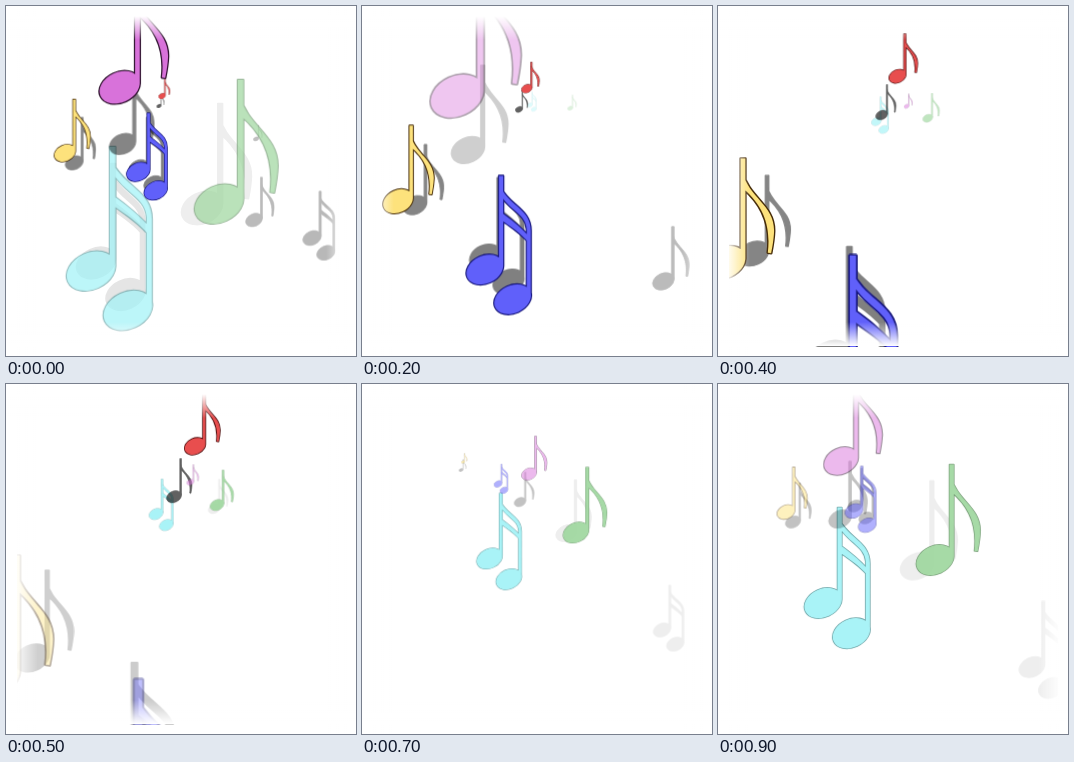
Recreate the animation shown at these times as an HTML page. Size 350x350 px, loop 1000 ms.

```html
<!DOCTYPE html>
<html lang="en">
<head>
<meta charset="utf-8">
<title>Floating notes</title>
<style>
  html, body { margin: 0; width: 100%; height: 100%; overflow: hidden; background: #fff; }
  svg { display: block; width: 100vw; height: 100vh; }
  path { paint-order: stroke; stroke-linejoin: round; }
</style>
</head>
<body>
<svg viewBox="0 0 350 350">
  <defs>
    <linearGradient id="fadeOut"><stop stop-color="#fff" stop-opacity="0"/><stop offset="1" stop-color="#fff"/></linearGradient>
    <clipPath id="frame"><rect x="11" y="10" width="329" height="331"/></clipPath>
    <rect id="edge" width="24" height="350" fill="url(#fadeOut)"/>
  </defs>
  <g id="notes" clip-path="url(#frame)"></g>
  <use href="#edge" x="320"/>
  <use href="#edge" transform="translate(32 350) rotate(180)"/>
  <use href="#edge" transform="translate(350 316) rotate(90)"/>
  <use href="#edge" transform="translate(0 34) rotate(-90)"/>
</svg>
<script>
const STEPS = 10, LOOP = 1000;
const layer = document.getElementById('notes');

// Shapes are drawn around the first head, with a stem 100 units tall.
const head = 'M-18.5 8.5A20.3 14.6 -25 1 1 18.5 -8.5A20.3 14.6 -25 1 1 -18.5 8.5Z';
const stem = 'M15 -99.5H19.5V-4H15Z';
const single = head + stem +
  'M17 -86C23 -62 47.5 -55 47 -30C46.7 -22 45.2 -14 44.2 -9L41 -9.5C43.5 -30 40 -52 17 -71Z';
const pair = head + stem +
  'M11 40A20.3 14.6 -25 1 1 48 23A20.3 14.6 -25 1 1 11 40Z' +
  'M17 -87C27 -67 49 -64 48.7 -41V28H44.5V-43C43.5 -59 27 -62 17 -79Z' +
  'M17 -61C28 -53 36 -47 46 -36V-29C38 -39 28 -45 17 -53Z';

const lerp = (a, b, k) => a + (b - a) * k;

// Key pose: [step, x, y, height, bend]; bend 0 arrives evenly, 1 quadratically.
function poseAt(keys, step) {
  const i = keys.findIndex(k => k[0] >= step);
  if (i < 0 || step < keys[0][0]) return null;
  const b = keys[i], a = keys[Math.max(0, i - 1)];
  const u = (step - a[0]) / (b[0] - a[0] || 1);
  const k = lerp(u, u * u, b[4] || 0);
  const [x, y, h] = [1, 2, 3].map(n => lerp(a[n], b[n], k));
  return { x, y, h };
}

// Motion may run past the end of the loop into its next round.
function note(shape, fill, line, width, glow, keys) {
  const el = document.createElementNS('http://www.w3.org/2000/svg', 'path');
  el.setAttribute('d', shape);
  Object.assign(el.style, { fill, stroke: line, strokeWidth: width });
  layer.append(el);
  const last = keys.at(-1)[0];
  const frames = [];
  for (let i = 0; i <= STEPS; i++) {
    let step = i % STEPS, p = poseAt(keys, step);
    if (!p) p = poseAt(keys, step += STEPS);
    frames.push({
      offset: i / STEPS,
      easing: 'step-end',
      transform: p ? `translate(${p.x}px, ${p.y}px) scale(${p.h / 100})` : 'scale(.01)',
      opacity: p ? glow(step, last, p.h) : 0
    });
  }
  el.animate(frames, { duration: LOOP, iterations: Infinity }).startTime = 0;
}

// Near notes start pale, turn solid in the new round and dissolve at the end.
const near = (step, last) => step < STEPS ? .5 : step === last ? .4 : 1;
const far = (step, last, h) => (step === last ? .7 : .9) * Math.min(1, h / 35);
const shadow = (shape, glow, keys) => note(shape, '#000', '#000', 1.6, glow, keys);
const faint = a => () => a;
const cast = a => (step, last) => a * near(step, last);

// distant shadows
shadow(pair, faint(.1), [[10, 90, 257, 100]]);
shadow(single, faint(.07), [[5, 208, 125, 30], [10, 196, 202, 105, .36]]);
shadow(single, faint(.27), [[10, 248, 214, 43], [13, 328, 306, 61]]);
shadow(pair, faint(.28), [[10, 306, 232, 47], [11, 333, 278, 50]]);
shadow(pair, faint(.07), [[7, 300, 246, 45], [9, 314, 283, 66]]);
shadow(single, faint(.25), [[10, 250, 133, 14], [11, 300, 154, 18]]);

note(pair, '#a0f2f6', '#5d9a9d', 1.6, far,
  [[1, 169, 97, 12], [5, 150, 130, 35, 1], [9, 105, 219, 96], [10, 85, 265, 125]]);
note(single, '#9cd69c', '#6f986f', 1.6, far,
  [[1, 208, 101, 12], [5, 211, 121, 35, 1], [9, 217, 176, 96], [10, 213, 198, 125]]);

// near shadows
shadow(single, cast(.48), [[7, 158, 118, 30], [9, 122, 135, 58], [12, 106, 144, 85]]);
shadow(single, cast(.48), [[7, 99, 86, 11], [9, 75, 138, 39], [15, 26, 274, 88, .2]]);
shadow(single, cast(.62), [[10, 153, 100, 12], [16, 173, 117, 47, .6]]);
shadow(pair, cast(.5), [[9, 137, 122, 38], [15, 106, 408, 130, .2]]);

// near notes
note(single, '#fde27c', '#452b08', 2.6, near,
  [[7, 101, 78, 9], [9, 68, 128, 45], [15, -10, 292, 121, .36]]);
note(single, '#d872da', '#2c0f2c', 2.4, near,
  [[3, 190, 101, 11], [7, 167, 90, 38, 1], [9, 123, 77, 87], [12, 95, 90, 135]]);
note(single, '#e84e4e', '#4c0c0c', 3, near,
  [[10, 156, 90, 17], [16, 200, 53, 65, .6]]);
note(pair, '#6060fa', '#15157a', 2.4, near,
  [[7, 136, 100, 20], [9, 136, 127, 45], [15, 104, 460, 165, .36]]);
</script>
</body>
</html>
```
